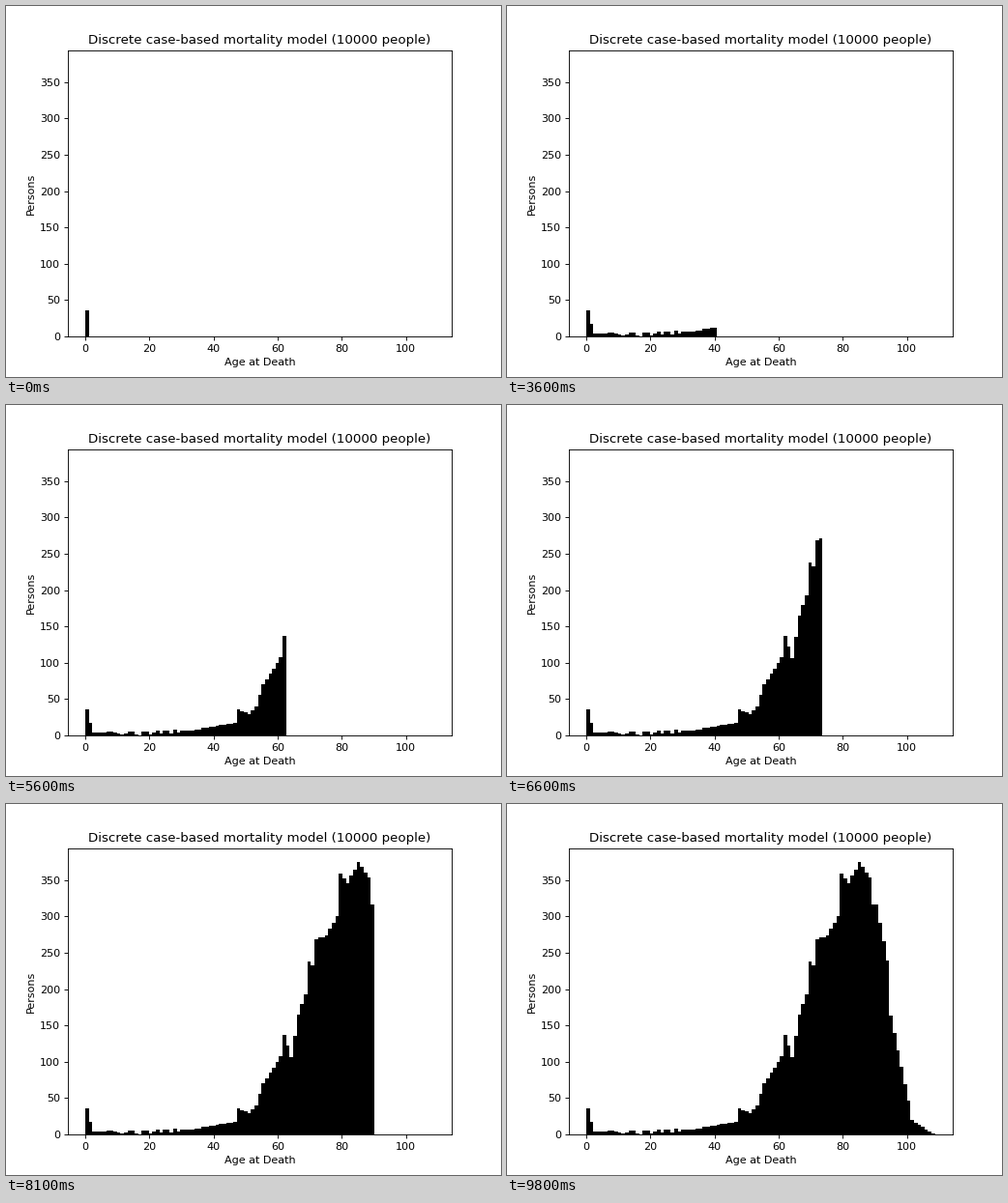
A matplotlib script for the animation above (9900 ms loop, 512x384 px).

```python
import numpy as np
import matplotlib.pyplot as plt
from matplotlib.animation import FuncAnimation

BINS = 99
OLDEST = 108.8
PEAK = 375
FRAME_MS = 100

# Turning points of the mortality curve: (bin, deaths)
INFANCY = [(0, 36), (1, 17), (2, 4)]
YOUTH = [(14, 2.5), (30, 7), (42, 17)]
MIDDLE_AGE = [(43, 35), (46, 29), (48, 40), (50, 70), (55, 107),
              (56, 137), (58, 106), (60, 165), (62, 193)]
OLD_AGE = [(63, 238), (64, 233), (65, 269), (68, 274), (71, 300),
           (72, 359), (74, 346), (77, PEAK), (80, 354)]
DECLINE = [(81, 317), (82, 317), (85, 240), (86, 163),
           (91, 46), (92, 20), (96, 6), (98, 1)]


def youth_ripple(bins):
    """Small quickening swings in the sparse early bins."""
    u = bins - 6.5
    envelope = np.exp(-((bins - 18) / 12) ** 2)
    return 3 * envelope * np.cos(2 * np.pi * (0.117 * u + 0.0083 * u**2))


def death_counts():
    bins = np.arange(BINS)
    key_bins, key_deaths = zip(*INFANCY, *YOUTH, *MIDDLE_AGE, *OLD_AGE, *DECLINE)
    curve = np.interp(bins, key_bins, key_deaths)
    return np.maximum(np.rint(curve + youth_ripple(bins)), 0)


deaths = death_counts()
edges = np.linspace(0, OLDEST, BINS + 1)

fig, ax = plt.subplots(figsize=(6.4, 4.8), dpi=80)
bars = ax.bar(edges[:-1], deaths, width=np.diff(edges), align="edge", color="black")
ax.set_xlim(-0.05 * OLDEST, 1.05 * OLDEST)
ax.set_ylim(0, 1.05 * PEAK)
ax.set_title("Discrete case-based mortality model (10000 people)")
ax.set_xlabel("Age at Death")
ax.set_ylabel("Persons")


def update(frame):
    """Reveal every bin up to the current one."""
    for i, bar in enumerate(bars):
        bar.set_visible(i <= frame)
    return bars.patches


anim = FuncAnimation(fig, update, frames=BINS, interval=FRAME_MS,
                     repeat=True, repeat_delay=0)
plt.show()
```
